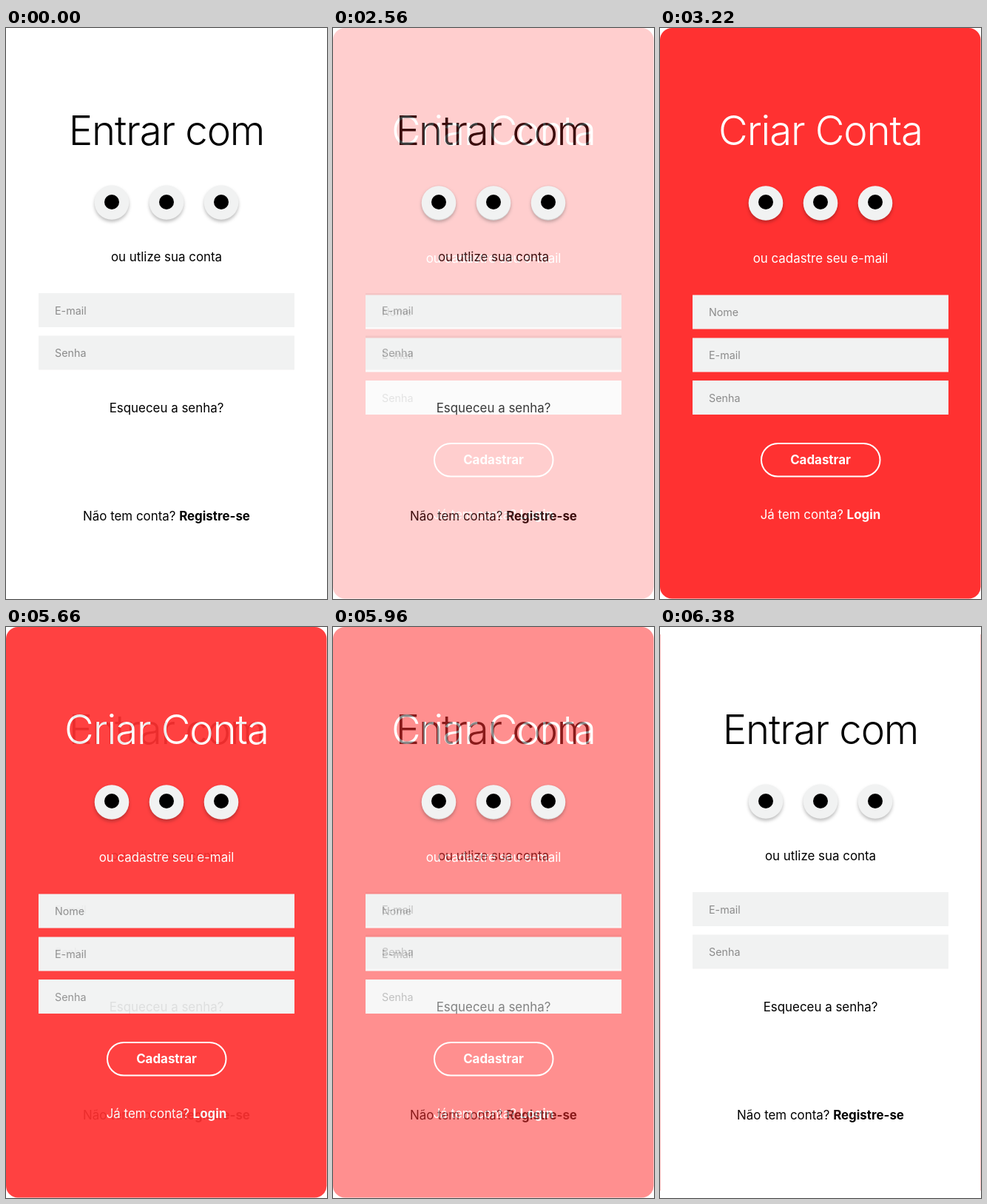
Write an HTML page that moves like this. It is 434 px wide and 771 px high and loops after 6.44 s.

```html
<!DOCTYPE html>
<html lang="pt">
<head>
<meta charset="utf-8">
<style>
  html, body { margin: 0; width: 100%; height: 100%; overflow: hidden; background: #fff; }
  svg { display: block; width: 100%; height: 100%; }
  text { font: 16.9px Inter, sans-serif; font-optical-sizing: none; text-anchor: middle; }
  .title { font-size: 54.5px; font-weight: 300; letter-spacing: -.02em; }
  .bold { font-weight: 700; }
  .hint { font-size: 14.3px; text-anchor: start; fill: #8b8b8b; }
  .social { filter: drop-shadow(0 3px 2px rgba(0, 0, 0, .25)); }
</style>
</head>
<body>
<svg viewBox="0 0 434 771">
  <g id="login"></g>
  <g id="signup"></g>
  <path id="edges" d="M.5 10V761M433.5 10V761" stroke="#fbc4c4"/>
</svg>
<script>
const LOOP = 6440, HOLD = 2440, HALF = LOOP / 2, STEP = 60, FADE_STEPS = 13;
const $ = id => document.getElementById(id);

const label = (y, content, cls = '') => `<text x="217" y="${y}" class="${cls}">${content}</text>`;

const field = (y, hint) =>
  `<rect x="44" y="${y}" width="346" height="46" fill="#f1f2f2"/>
   <text x="66" y="${y + 28.5}" class="hint">${hint}</text>`;

const socials = y => [143, 217, 291].map(x =>
  `<circle class="social" cx="${x}" cy="${y}" r="23.3" fill="#f1f2f2"/>
   <circle cx="${x}" cy="235" r="10"/>`).join('');

$('login').innerHTML =
  '<rect width="434" height="771" fill="#fff"/>' +
  label(158, 'Entrar com', 'title') + socials(235.5) +
  label(315, 'ou utlize sua conta') +
  field(358, 'E-mail') + field(415.5, 'Senha') +
  label(519, 'Esqueceu a senha?') +
  label(664.5, 'Não tem conta? <tspan class="bold">Registre-se</tspan>');

$('signup').innerHTML =
  `<rect width="434" height="771" fill="#fff"/>
   <rect width="433.5" height="770.5" rx="16" fill="#ff3131"/>
   <g fill="#fff">${label(158, 'Criar Conta', 'title')}
   ${label(316.5, 'ou cadastre seu e-mail')}
   ${label(589, 'Cadastrar', 'bold')}
   ${label(663, 'Já tem conta? <tspan class="bold">Login</tspan>')}</g>` +
  socials(236.5) +
  field(360.5, 'Nome') + field(418.5, 'E-mail') + field(476, 'Senha') +
  '<rect x="137" y="561" width="160.5" height="44.5" rx="22.25" fill="none" stroke="#fff" stroke-width="2"/>';

function draw(now) {
  const t = now % LOOP;
  const returning = t >= HALF;
  const step = Math.floor((t % HALF - HOLD) / STEP) + 1;
  const progress = Math.min(1, Math.max(0, step / FADE_STEPS));
  $('signup').setAttribute('opacity', returning ? 1 - progress : progress);
  $('edges').setAttribute('opacity', returning && progress === 1 ? 1 : 0);
}

const start = performance.now();
(function tick() {
  draw(performance.now() - start);
  requestAnimationFrame(tick);
})();
</script>
</body>
</html>
```
